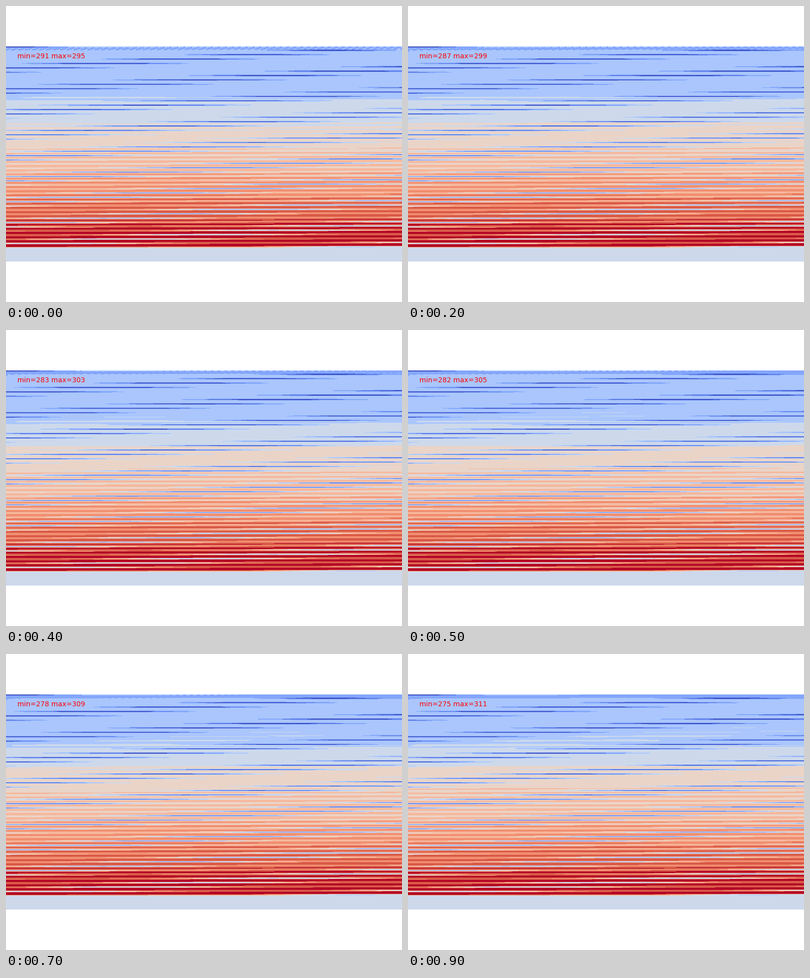
These frames come from a looping animation (800x600 px, 1000 ms). A matplotlib script:

```python
import numpy as np
import matplotlib.pyplot as plt
from matplotlib.animation import FuncAnimation

COLS, ROWS = 360, 196
LAYERS, CELLS = 48, 1372      # atmospheric layers and cells in each layer
FRAMES = 10

# Flattened cell index, wrapped row by row into the picture
index = np.arange(COLS * ROWS)
layer = np.minimum(index // CELLS, LAYERS - 1)
cell = index % CELLS
pole_distance = np.minimum(cell, CELLS - cell)
sin2_lat = (1 - 2 * cell / CELLS) ** 2
unused = index >= LAYERS * CELLS

# Profiles from the top layer down, scaled to 0 (coldest) .. 1 (warmest)
top = layer == 0
equator = np.minimum(.305 + .0065 * layer + .0115 * np.maximum(layer - 11, 0), .98)
pole = .02 + .33 * (layer / (LAYERS - 1)) ** 2
slope = -.035 + .29 / (1 + np.exp((22 - layer) / 3))
cap_width = 72 - 32 * np.exp(-layer / 3) + .1 * layer
upper = np.exp(-((layer - 9) / 4) ** 2)
middle = np.exp(-((layer - 20) / 4) ** 2)
ripple = .014 * np.sin(index)


def temperature(frame):
    tau = frame / (FRAMES - 1)
    warm = equator + .045 * tau * middle
    warm = warm + top * (ripple * (1 - tau) - .016 - .01 * tau)
    base = warm - (slope - .04 * tau * upper) * sin2_lat
    width = cap_width * (1 + .1 * min(frame / 2, 1) * (layer < 8))
    cap = np.exp(-(pole_distance / width) ** 3)
    field = base + (pole - base) * cap
    field[unused] = .45
    return field.reshape(ROWS, COLS)


def label_text(frame):
    step = frame + 1
    low = round(293 - 2.05 * step + .025 * step ** 2)
    high = min(295 + 2 * frame, 302 + frame)
    return f"min={low} max={high}"


fig = plt.figure(figsize=(8, 6), dpi=100, facecolor="white")
ax = fig.add_axes([0, 0, 1, 1])
ax.set_axis_off()
image = ax.imshow(temperature(0), cmap=plt.get_cmap("coolwarm", 10),
                  vmin=0, vmax=1)
label = ax.text(10, 10, label_text(0), color="red", fontsize=10,
                family="DejaVu Sans")


def draw(frame):
    image.set_data(temperature(frame))
    label.set_text(label_text(frame))
    return image, label


anim = FuncAnimation(fig, draw, frames=FRAMES, interval=1000 / FRAMES,
                     repeat=True, repeat_delay=0)
plt.show()
```
